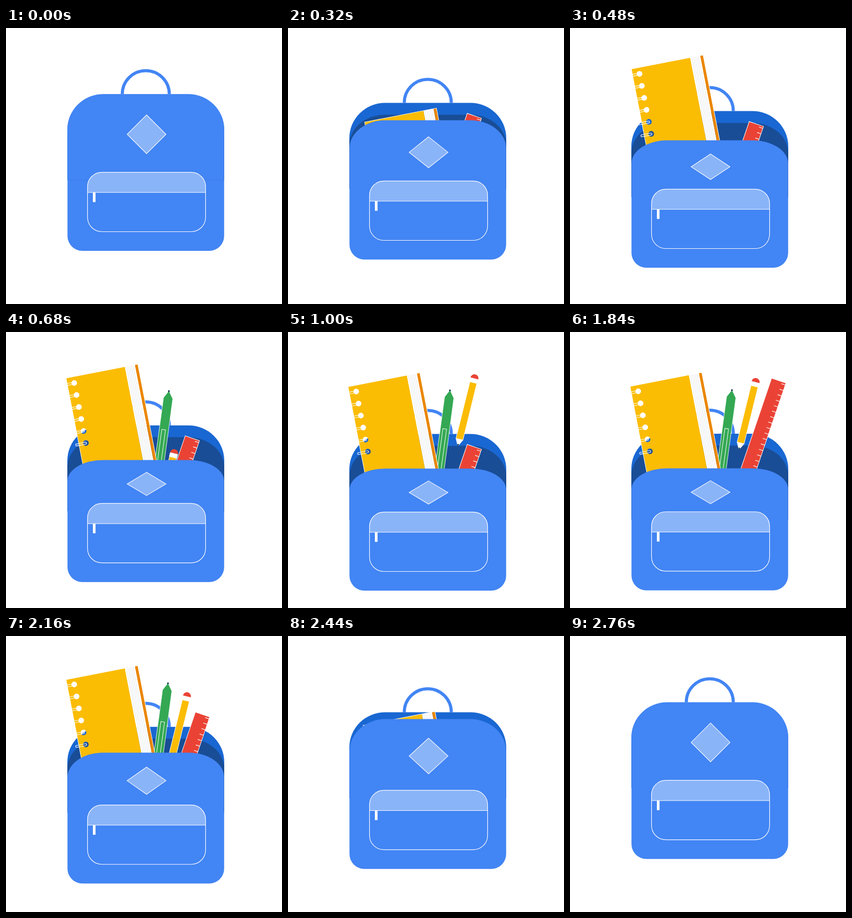
An HTML page with a canvas for the animation above (2800 ms loop, 540x540 px).

```html
<!DOCTYPE html>
<html lang="en">
<head>
<meta charset="utf-8">
<title>Backpack</title>
<style>
  html, body { margin: 0; width: 100%; height: 100%; overflow: hidden; background: #fff; }
  canvas { display: block; width: 540px; height: 540px; }
</style>
</head>
<body>
<canvas id="stage" width="540" height="540"></canvas>
<script>
const ctx = document.getElementById('stage').getContext('2d');
const LOOP = 2800;
const CLOSING = 1790;
const LEFT = 120.3, RIGHT = 426.8, SEAM = 297.5, HOOD = 168;
const BLUE = '#4285f4', MID = '#1967d2', SHADE = '#194d96', PALE = '#8ab4f8';
const YELLOW = '#fbbc04', ORANGE = '#ea8600', GREEN = '#34a853', RED = '#ea4335';
const INK = '#1b3a57';

const mix = (a, b, k) => a + (b - a) * k;
function ease(t, start, end) {
  const u = Math.min(1, Math.max(0, (t - start) / (end - start)));
  return u * u * (3 - 2 * u);
}

// Distance below the resting place: rise past it, then settle.
function pop(t, start, peak, end, depth, over) {
  return t < peak ? mix(depth, over, ease(t, start, peak)) : mix(over, 0, ease(t, peak, end));
}

function paint(fill, stroke, width = 1) {
  if (fill) { ctx.fillStyle = fill; ctx.fill('evenodd'); }
  if (stroke) { ctx.strokeStyle = stroke; ctx.lineWidth = width; ctx.stroke(); }
}

function poly(points, fill, stroke, width) {
  ctx.beginPath();
  points.forEach(([x, y]) => ctx.lineTo(x, y));
  ctx.closePath();
  paint(fill, stroke, width);
}

function box(x, y, w, h, fill, stroke, width) {
  ctx.beginPath();
  ctx.rect(x, y, w, h);
  paint(fill, stroke, width);
}

function line(x1, y1, x2, y2, color, width = 1) {
  ctx.beginPath();
  ctx.moveTo(x1, y1);
  ctx.lineTo(x2, y2);
  paint(null, color, width);
}

function placed(x, y, degrees, draw) {
  ctx.save();
  ctx.translate(x, y);
  ctx.rotate(degrees * Math.PI / 180);
  draw();
  ctx.restore();
}

function hoodPath(scale, left, right) {
  const rx = 70, ry = 69 * scale, y = SEAM - HOOD * scale + ry;
  ctx.beginPath();
  ctx.moveTo(left, SEAM);
  ctx.ellipse(left + rx, y, rx, ry, 0, Math.PI, Math.PI * 1.5);
  ctx.ellipse(right - rx, y, rx, ry, 0, -Math.PI / 2, 0);
  ctx.lineTo(right, SEAM);
}

function hood(scale, color) {
  hoodPath(scale, 120, 427);
  ctx.closePath();
  paint(color);
}

function notebook() {
  const length = 200, holes = [0, 1, 2, 3, 4, 5].map(i => 12.4 + i * 23.93);
  ctx.beginPath();
  ctx.rect(0, 0, 117.2, length);
  for (const y of holes) {
    ctx.moveTo(19.4, y);
    ctx.arc(13.9, y, 5.5, 0, Math.PI * 2);
  }
  paint(YELLOW);
  box(117.2, 0, 20, length, '#fff');
  for (let i = 1; i < 6; i++) line(117.2 + i * 3.2, 0, 117.2 + i * 3.2, length, '#e4e6e9', 0.9);
  box(137.2, 0, 5.8, length, ORANGE);
  box(0, 0, 143, length, null, '#fff');
  for (const y of holes) {
    ctx.beginPath();
    ctx.roundRect(-6.6, y - 1.6, 22, 3.8, 1.9);
    paint(null, '#fff', 1.1);
  }
}

function pen() {
  poly([[0, 0], [9.5, 14.8], [9.5, 190], [-8.7, 190], [-8.7, 14.8]], GREEN, '#fff', 0.8);
  box(-3.7, 76.8, 7.2, 80, null, '#fff');
  ctx.beginPath();
  ctx.arc(0, 0.8, 1.8, 0, Math.PI * 2);
  paint(INK);
}

function pencil() {
  box(-8, 0, 16, 8.5, '#fff');
  ctx.beginPath();
  ctx.arc(0, 0, 8, Math.PI, 0);
  ctx.closePath();
  paint(RED);
  poly([[-7.5, 122.5], [7.5, 122.5], [1.2, 135], [-1.2, 135]], '#fff');
  poly([[-1.9, 132.3], [1.9, 132.3], [0.8, 135.3], [-0.8, 135.3]], INK);
  box(-7, 8.5, 14, 114, YELLOW, '#fff');
}

function ruler() {
  box(0, 0, 29.5, 230, RED, '#fff');
  for (let y = 4; y < 225; y += 11.3) line(21.5, y, 29.5, y, '#fff', 1.2);
}

function contents(t) {
  const out = t >= CLOSING;
  const book = out ? 207 * ease(t, 2200, 2640) : pop(t, 150, 600, 680, 207, -31);
  const penGap = out ? 225 * ease(t, 2165, 2600) : pop(t, 350, 800, 880, 225, -25);
  const pencilGap = out ? 200 * ease(t, 2000, 2550) : pop(t, 570, 950, 1050, 200, -16);
  const rulerGap = out ? 129 * ease(t, 1860, 2380) : 129 * (1 - ease(t, 1040, 1400));

  ctx.save();
  ctx.beginPath();
  ctx.rect(0, -200, 540, 600);
  ctx.clip();
  placed(394.5 - rulerGap * (out ? 0.3 : 0.34), 21 + rulerGap, 18.8, ruler);
  placed(363 - pencilGap * 0.22, 28.5 + pencilGap, 13.8, pencil);
  placed(317 + penGap * 0.1, 43.5 + penGap, 7.7, pen);
  placed(117.5 + book * (book > 0 ? 0.25 : 0.33), 37 + book, -11, notebook);
  ctx.restore();
}

function pocket() {
  const outline = () => {
    ctx.beginPath();
    ctx.roundRect(159.5, 282.3, 231, 116.2, 28);
  };
  ctx.save();
  outline();
  ctx.clip();
  box(159, 282, 232, 39.8, PALE);
  ctx.restore();
  line(159.5, 321.8, 390.5, 321.8, '#fff', 1.1);
  outline();
  paint(null, '#fff', 1.2);
  box(170, 322, 5.2, 18.6, '#fff');
}

function front(scale) {
  hoodPath(scale, LEFT, RIGHT);
  ctx.arcTo(RIGHT, 436, LEFT, 436, 29);
  ctx.arcTo(LEFT, 436, LEFT, SEAM, 29);
  ctx.closePath();
  paint(BLUE);
  const y = SEAM - 89.5 * scale, h = 38 * scale;
  poly([[275, y - h], [313, y], [275, y + h], [237, y]], PALE, '#fff', 1.1);
}

function draw(t) {
  const lift = 70 * (t < CLOSING ? ease(t, 0, 1000) : 1 - ease(t, CLOSING, 2790));
  const shut = t < CLOSING ? 1 - ease(t, 0, 640) : ease(t, 1920, 2650);
  const scale = mix(0.597, 1, shut);
  const lip = Math.min(scale, 0.766 + 0.08 * shut);

  ctx.fillStyle = '#fff';
  ctx.fillRect(0, 0, 540, 540);
  ctx.save();
  ctx.translate(0, lift);

  ctx.beginPath();
  ctx.arc(273.5, 129.5, 46, Math.PI, 0);
  paint(null, BLUE, 6);
  hood(1, shut > 0.999 ? BLUE : MID);
  if (scale < 0.862) hood(0.862, SHADE);
  contents(t);
  if (lip < scale) hood(lip, MID);
  front(scale);
  if (t < 40) line(LEFT, SEAM, RIGHT, SEAM, '#3d7ce8', 0.8);
  pocket();
  ctx.restore();
}

function tick() {
  draw(performance.now() % LOOP);
  requestAnimationFrame(tick);
}
tick();
</script>
</body>
</html>
```
